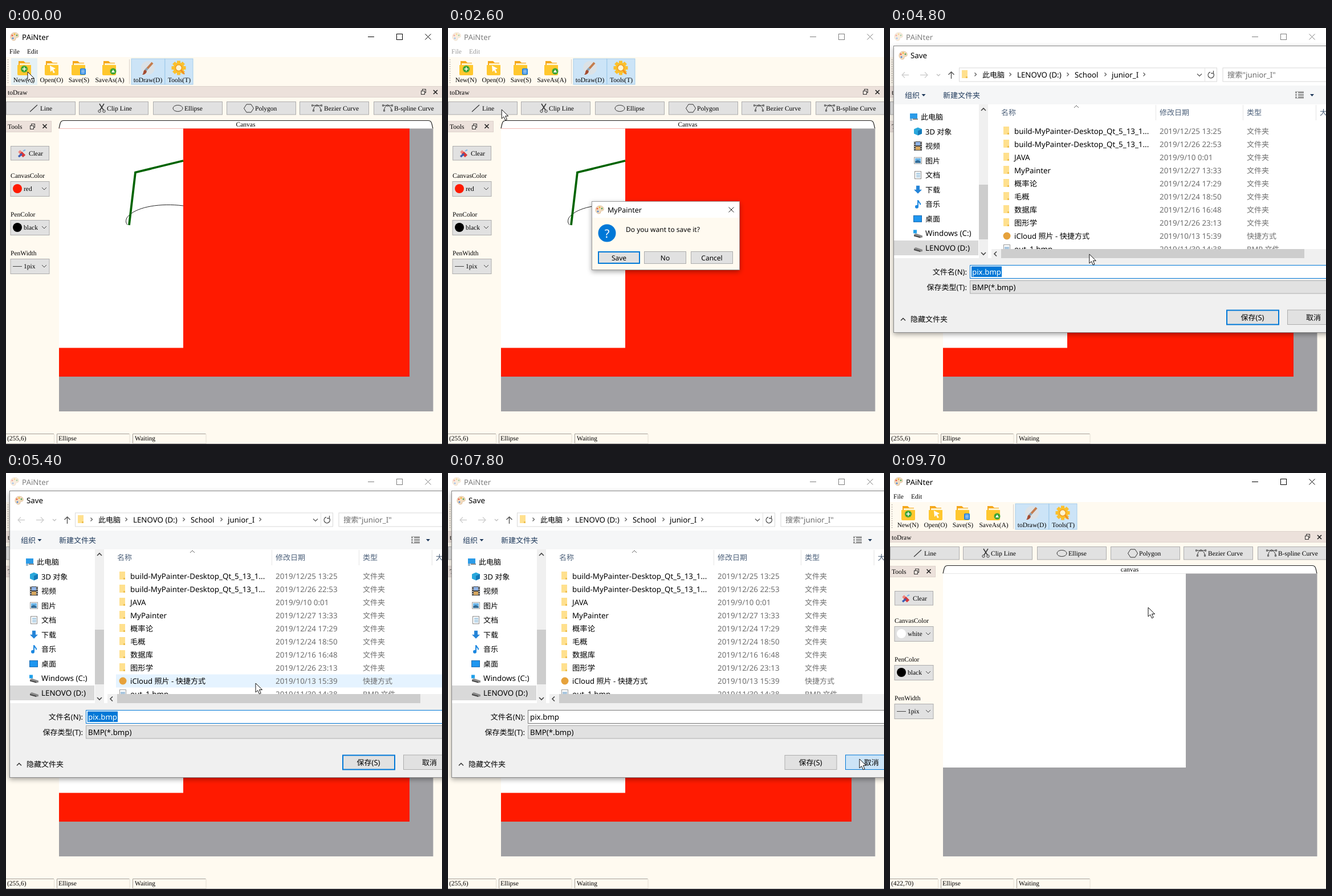
These frames come from a looping animation (765x732 px, 9800 ms). An HTML page:

```html
<!DOCTYPE html>
<html lang="en">
<head>
<meta charset="utf-8">
<title>Painter</title>
<style>
html, body { margin: 0; width: 100%; height: 100%; overflow: hidden; background: #fffaf0; }
svg { display: block; width: 765px; height: 732px; }
text { white-space: pre; text-rendering: geometricPrecision; }
.serif { font: 11.5px "Liberation Serif", "Times New Roman", serif; }
.sans { font: 13.3px "Noto Sans", "Noto Sans CJK SC", "Noto Sans CJK", sans-serif; }
</style>
</head>
<body>
<svg id="stage" viewBox="0 0 765 732"></svg>
<script>
const LOOP = 9800, STEP = 100;

// Drawing helpers
const rect = (x, y, w, h, fill, extra = '') =>
  `<rect x="${x}" y="${y}" width="${w}" height="${h}" fill="${fill}" ${extra}/>`;
const box = (x, y, w, h, fill, line, lw = 1, extra = '') =>
  rect(x + lw / 2, y + lw / 2, w - lw, h - lw, fill, `stroke="${line}" stroke-width="${lw}" ${extra}`);
const path = (d, line, lw = 1, fill = 'none', extra = '') =>
  `<path d="${d}" fill="${fill}" stroke="${line}" stroke-width="${lw}" ${extra}/>`;
const fillPath = (d, fill) => path(d, 'none', 0, fill);
const circle = (x, y, r, fill, extra = '') => `<circle cx="${x}" cy="${y}" r="${r}" fill="${fill}" ${extra}/>`;
const text = (cls, x, y, s, fill, extra) => `<text class="${cls}" x="${x}" y="${y}" fill="${fill}" ${extra}>${s}</text>`;
const serif = (x, y, s, fill = '#000', extra = '') => text('serif', x, y, s, fill, extra);
const sans = (x, y, s, fill = '#000', size = 13.3, extra = '') =>
  text('sans', x, y, s, fill, `style="font-size:${size}px" ${extra}`);
const group = (id, body, extra = '') => `<g id="${id}" ${extra}>${body}</g>`;
const at = (x, y, body) => `<g transform="translate(${x} ${y})">${body}</g>`;
const chevron = (x, y, dir, s = 4, line = '#555', lw = 1.2) => {
  const d = {
    down: `M${x - s} ${y - s / 2}l${s} ${s}l${s} ${-s}`,
    up: `M${x - s} ${y + s / 2}l${s} ${-s}l${s} ${s}`,
    right: `M${x - s / 2} ${y - s}l${s} ${s}l${-s} ${s}`,
    left: `M${x + s / 2} ${y - s}l${-s} ${s}l${s} ${s}`
  };
  return path(d[dir], line, lw);
};
const cross = (x, y, s, line = '#222', lw = 1) =>
  path(`M${x - s} ${y - s}l${2 * s} ${2 * s}M${x + s} ${y - s}l${-2 * s} ${2 * s}`, line, lw);
const arrowShape = 'M0 0V16L3.7 12.6L6.4 18.8L9.2 17.6L6.5 11.5H11.6Z';

// Icons
const palette = (x, y) => at(x, y,
  path('M0 -7C5 -7 8 -4 7 0C6 3 3 1 2 3C2 6 1 7 -2 7C-9 5 -9 -6 0 -7Z', '#d9b48a', 0.8, '#f3dcc0') +
  circle(-4, -2, 1.5, '#e8604c') + circle(0, -4, 1.4, '#f2b632') +
  circle(4, -2, 1.4, '#58a55c') + circle(-3, 3, 1.5, '#4a86d8'));
const folder = (x, y, badge = '') => at(x, y,
  fillPath('M-10 -12H-1L2 -9H10V8H-10Z', '#f5a81c') + rect(-8, -8, 18, 10, '#fff3cf') +
  fillPath('M-12 -5H12V11Q12 13 10 13H-10Q-12 13 -12 11Z', '#ffc72e') + badge);
const smallFolder = (x, y) => at(x, y,
  rect(-5, -7, 9, 14, '#f3cf6a') + fillPath('M-5 -7H5V5L2 7H-5Z', '#ffe08e') + rect(2, 4, 3, 3, '#eebf50'));
const drive = (x, y) => at(x, y, fillPath('M-7 -1L-4 -3L8 1V4L4 5L-7 1Z', '#8a8a8a') + fillPath('M-7 0L4 3V5L-7 2Z', '#444'));
const floatIcon = (x, y) => box(x - 2, y - 5, 7, 7, 'none', '#333') + box(x - 4, y - 2, 7, 7, '#ede3dd', '#333');
const nodes = (x, y) => at(x, y,
  path('M-6 5C-6 0 -3 -4 0 -4S7 0 7 5M-8 -4H8', '#333', 1) +
  [[-8, -4], [0, -4], [8, -4], [-6, 5], [7, 5]].map(([a, b]) => box(a - 1.5, b - 1.5, 3, 3, '#e1e1e1', '#333', 0.8)).join(''));

const toolIcons = {
  Line: path('M42 147L55 135', '#333', 1.1),
  'Clip Line': path('M164 133L171 144M172 133L165 144', '#333', 1.5) +
    circle(164, 146, 2.2, 'none', 'stroke="#333"') + circle(172, 146, 2.2, 'none', 'stroke="#333"'),
  Ellipse: '<ellipse cx="301.500" cy="141" rx="8.500" ry="5.500" fill="none" stroke="#333"/>',
  Polygon: path('M417.500 141L422 134H430L434.500 141L430 148H422Z', '#333'),
  'Bezier Curve': nodes(545.5, 140),
  'B-spline Curve': nodes(669.5, 140)
};

const gear = () => {
  let d = '';
  for (let i = 0; i < 8; i++) {
    const a = i * Math.PI / 4;
    d += `M0 0L${(12.5 * Math.cos(a)).toFixed(1)} ${(12.5 * Math.sin(a)).toFixed(1)}`;
  }
  return at(303, 70, path(d, '#fbc02d', 6) + circle(0, 0, 9.5, '#fbc02d') +
    circle(0, 0, 5.5, '#fff4d0', 'stroke="#ee9f20" stroke-width="1.500"') + path('M4 4L10 11', '#f08a24', 2.5));
};

function titleBar() {
  return rect(0, 0, 765, 51, '#fff') + group('title', palette(15, 15) + sans(28, 20.5, 'PAiNter') +
    path('M635 15.500H646', '#000') + box(685, 10, 11, 11, 'none', '#000') + cross(740.5, 15.5, 5, '#000')) +
    group('menu', serif(6, 45, 'File') + serif(37, 45, 'Edit'));
}

function toolbar() {
  const label = (x, s) => serif(x, 95, s, '#000', 'text-anchor="middle"');
  return path('M3.500 55V99', '#b5aca4', 1.5, 'none', 'stroke-dasharray="1.500 2.500"') +
    group('hover', rect(9, 53, 46, 47, '#e5f1f5')) +
    box(219.5, 53.5, 59.5, 46, '#cce4f7', '#a5cdec') + box(278.5, 53.5, 50, 46, '#cce4f7', '#a5cdec') +
    path('M216.500 55V98', '#d8d2ca') +
    folder(32, 70, circle(0, 2, 6, '#3fa535') + path('M-3.500 2H3.500M0 -1.500V5.500', '#fff', 1.5)) +
    folder(80, 70, fillPath('M-3 -4L7 1L3 3L6 8L3 9L1 4L-2 7Z', '#fff')) +
    folder(127, 70, rect(3, 1, 10, 11, '#2583e0', 'rx="1.500"') + path('M5 4H11M5 6.500H11M5 9H11', '#fff')) +
    folder(181, 70, circle(7, 6, 5.5, '#3fa535') + fillPath('M7 3L10 8H4Z', '#fff')) +
    circle(249, 70, 12, '#dce2e6') + path('M248 71L257 61', '#c47d4e', 4) + path('M245 74L248 71', '#8ca1b2', 4) +
    fillPath('M239 82C242 80 240 75 244 73L247 76C246 80 243 82 239 82Z', '#a34c32') + gear() +
    label(31.5, 'New(N)') + label(80, 'Open(O)') + label(128, 'Save(S)') + label(182, 'SaveAs(A)') +
    label(249, 'toDraw(D)') + label(304, 'Tools(T)');
}

function drawDock() {
  const buttons = [['Line', 0, 60], ['Clip Line', 128, 177], ['Ellipse', 258, 313], ['Polygon', 387, 437],
    ['Bezier Curve', 515, 558], ['B-spline Curve', 645, 681]];
  return box(-1, 102, 768, 20, '#ece1db', '#ddd2cc') + serif(3, 117, 'toDraw') + floatIcon(732, 112) + cross(753.5, 112.5, 3.5, '#222', 1.6) +
    buttons.map(([s, x, tx]) => box(x, 129, 122, 23.5, '#e1e1e1', '#adadad') + toolIcons[s] + serif(tx, 145, s)).join('');
}

function toolsDock() {
  const combo = (y, name, value, icon) => serif(8, y - 6, name) + box(7.5, y, 69, 27, '#e1e1e1', '#adadad') +
    icon + value + chevron(67, y + 13, 'down', 4, '#444', 1);
  const val = (y, s) => serif(31, y, s);
  return box(-1, 163, 81, 20, '#ece1db', '#ddd2cc') + serif(3, 177, 'Tools') + floatIcon(46, 173) + cross(68, 172.5, 3.5, '#222', 1.6) +
    box(8, 207, 68, 25.5, '#e1e1e1', '#adadad') +
    path('M23 216L27 220', '#f0847c', 5) + path('M26 219L32 225', '#d8363a', 6) + path('M22 226L28 221', '#3b5fb4', 3.5) +
    path('M30 216L34 214', '#7bb6e8', 2) + serif(40, 224, 'Clear') +
    combo(269, 'CanvasColor', `<text id="colorName" class="serif" x="31" y="286"></text>`, '<circle id="color" cx="20" cy="282" r="8"/>') +
    combo(337, 'PenColor', val(354, 'black'), circle(20, 350, 8, '#000')) +
    combo(405, 'PenWidth', val(422, '1pix'), path('M12 418.500H28', '#444'));
}

function canvasArea() {
  return path('M93 176.500C95 168 95 162.500 101 162.500H741C747 162.500 747 168 749 176.500', '#222', 1.2, '#fff') +
    `<text id="tab" class="serif" x="420.500" y="173" text-anchor="middle"></text>` +
    rect(93, 176.5, 656.5, 496.5, '#a0a0a4') +
    group('oldArt', rect(93, 176.5, 615, 435.5, '#ff1a00') + rect(93, 176.5, 218, 385, '#fff') +
      path('M213 345.500C208 340 211 332 217 328C232 314 270 307 311 312', '#222', 1) +
      path('M216 346L227 253.500L311 233', '#006400', 3.8)) +
    group('newArt', rect(93, 176.5, 426, 340.5, '#fff'));
}

function statusBar() {
  const cell = (x, w) => path(`M${x} 729V712.500H${x + w}`, '#a39e98') + path(`M${x + w + .5} 713V729.500H${x}`, '#e4ded4');
  return cell(-1, 85) + cell(89.5, 127) + cell(222.5, 128) +
    '<text id="status" class="serif" x="2" y="724"></text>' + serif(92, 724, 'Ellipse') + serif(226, 724, 'Waiting') +
    rect(0, 730, 765, 2, '#24242c');
}

function messageBox() {
  const button = (x, s, line) => box(x, 392, 74, 22, '#e1e1e1', line, line === '#0078d7' ? 2 : 1) +
    sans(x + 37, 407.5, s, '#000', 12, 'text-anchor="middle"');
  return box(252, 304, 260, 121, '#fffaf0', '#9a9a9a', 1, 'filter="url(#shadow)"') + rect(253, 305, 258, 28, '#fff') +
    palette(266, 319) + sans(280, 323.5, 'MyPainter', '#000', 12.5) + cross(497, 319, 4.5) +
    circle(279, 360, 15.5, '#0078d7') + sans(279, 367.5, '?', '#fff', 20, 'text-anchor="middle"') +
    sans(312, 358, 'Do you want to save it?', '#000', 12) +
    button(263, 'Save', '#0078d7') + button(344, 'No', '#adadad') + button(426, 'Cancel', '#adadad');
}

const files = [
  ['build-MyPainter-Desktop_Qt_5_13_1...', '2019/12/25 13:25'], ['build-MyPainter-Desktop_Qt_5_13_1...', '2019/12/26 22:53'],
  ['JAVA', '2019/9/10 0:01'], ['MyPainter', '2019/12/27 13:33'], ['概率论', '2019/12/24 17:29'], ['毛概', '2019/12/24 18:50'],
  ['数据库', '2019/12/16 16:48'], ['图形学', '2019/12/26 23:13'],
  ['iCloud 照片 - 快捷方式', '2019/10/13 15:39', '快捷方式'], ['out_1.bmp', '2019/11/30 14:38', 'BMP 文件']
];

const places = [
  ['此电脑', rect(-9, -6, 13, 9, '#2b9be8') + rect(-4, 3, 9, 2, '#888') + rect(-9, 3, 4, 4, '#9bb8cc')],
  ['3D 对象', fillPath('M-7 -4L0 -7L7 -4V4L0 7L-7 4Z', '#2aa8dc') + fillPath('M0 -1L7 -4V4L0 7Z', '#1479b8')],
  ['视频', rect(-7, -8, 14, 16, '#444') + rect(-4, -7, 8, 6, '#8fb4e8') + rect(-4, 1, 8, 6, '#d8a860') +
    path('M-5.500 -8V8M5.500 -8V8', '#ddd', 1.5, 'none', 'stroke-dasharray="2 2"')],
  ['图片', box(-7, -6, 14, 12, '#fff', '#999') + rect(-5, -4, 10, 8, '#69b4e8') + fillPath('M-5 4V1L0 -1L5 2V4Z', '#326a94')],
  ['文档', box(-6, -7, 12, 14, '#fff', '#888') + path('M-3 -3H4M-3 0H4M-3 3H4', '#4b93c4')],
  ['下载', fillPath('M-3 -7H3V0H7L0 7L-7 0H-3Z', '#2484d8')],
  ['音乐', path('M0 4V-7C1 -3 5 -3 4 1', '#1b87e0', 2) + circle(-2, 4.5, 3, '#1b87e0')],
  ['桌面', box(-8, -6, 15, 12, '#1e96f0', '#1567b0')],
  ['Windows (C:)', drive(0, 3) + rect(-8, -6, 6, 6, '#20a0ea')],
  ['LENOVO (D:)', drive(0, 2)]
];

function fileList() {
  const rows = files.map(([name, date, type = '文件夹'], i) => {
    const y = 181 + 23 * i, base = y + 4.5;
    const icon = i < 8 ? smallFolder(204, y - 1) : i === 8
      ? circle(205, y, 6.5, '#e6a23c')
      : box(199, y - 8, 12, 16, '#fff', '#999') + rect(201, y - 4, 8, 7, '#a9c6de');
    return icon + sans(218, base, name, '#000', i === 8 ? 13.1 : 13.35) + sans(473, base, date, '#6d6d6d', 13.35) + sans(626, base, type, '#6d6d6d', 13);
  }).join('');
  const head = (x, s) => sans(x, 153, s, '#4c607a', 13);
  return path('M466.500 135V162M619.500 135V162M747.500 135V162', '#e5e5e5') + chevron(327, 138, 'up', 4, '#666', 1) +
    head(195, '名称') + head(473, '修改日期') + head(626, '类型') + head(754, '大') +
    '<g clip-path="url(#list)"><rect id="rowHover" x="193" width="580" height="23" fill="#e5f3ff"/>' + rows + '</g>' +
    rect(178, 388, 590, 16, '#f0f0f0') + rect(195, 388, 532, 16, '#cdcdcd') + chevron(185, 396.5, 'left', 4, '#444', 1.6);
}

function saveDialog() {
  const nav = places.map(([s, icon], i) => {
    const y = 156 + 25.55 * i;
    return at(i ? 49 : 44, y, icon) + sans(i ? 62 : 54, y + 5, s, '#000', s.length > 6 ? 13.35 : 13);
  }).join('');
  const crumb = [[162, '此电脑', 13], [223, 'LENOVO (D:)'], [324, 'School'], [389, 'junior_I']];
  const triangle = (x, y) => fillPath(`M${x - 3.5} ${y - 2}h7l-3.500 4Z`, '#1e395b');
  return box(6, 31, 790, 504, '#f0f0f0', '#8a8a8a', 1, 'filter="url(#shadow)"') + rect(7, 32, 760, 372, '#fff') +
    palette(23, 48) + sans(36, 53, 'Save') +
    path('M33 82.500H21M26 77.500L21 82.500L26 87.500M53 82.500H66M61 77.500L66 82.500L61 87.500', '#cfcfcf', 1.3) +
    chevron(85, 82.5, 'down', 3, '#bbb') + path('M107.500 89V77M102.500 82L107.500 77L112.500 82', '#555', 1.4) +
    box(121, 69.5, 453, 25, '#fff', '#d9d9d9') + path('M552.500 70V94', '#e3e3e3') + smallFolder(131, 81) +
    [150, 211, 312, 378, 446].map(x => chevron(x, 81.5, 'right', 3, '#555')).join('') +
    crumb.map(([x, s, size]) => sans(x, 86.5, s, '#000', size)).join('') +
    chevron(543, 82.5, 'down', 4) + path('M567 79A5.200 5.200 0 1 1 562 77.500M567.500 75V79.500H563', '#555', 1.3) +
    box(583.5, 69.5, 200, 25, '#fff', '#d9d9d9') + sans(592, 86.5, '搜索"junior_I"', '#6d6d6d') +
    rect(7, 101, 760, 33, '#f5f6f7') + sans(26, 122.5, '组织', '#1e395b', 13) + triangle(59, 118) +
    sans(93, 122.5, '新建文件夹', '#1e395b', 13) + path('M711 113.500H714M711 117.500H714M711 121.500H714M716 113.500H726M716 117.500H726M716 121.500H726', '#777', 2) +
    path('M711 111.500H726M711 123.500H726', '#aaa') + triangle(740.5, 118) +
    rect(7, 373, 148, 26, '#d9d9d9') + nav +
    rect(156, 134, 16, 270, '#f0f0f0') + rect(156, 275, 16, 96, '#cdcdcd') +
    chevron(164, 143, 'up', 4, '#444', 1.6) + chevron(164, 396, 'down', 4, '#444', 1.6) + fileList() +
    sans(135, 433, '文件名(N):', '#000', 13, 'text-anchor="end"') + sans(135, 459.5, '保存类型(T):', '#000', 13, 'text-anchor="end"') +
    '<rect id="field" x="140.500" y="416.500" width="640" height="23" fill="#fff"/>' +
    '<rect id="selection" x="143" y="418.500" width="53" height="18.500" fill="#0078d7"/>' +
    '<text id="fileName" class="sans" x="144" y="432.500">pix.bmp</text>' +
    box(140, 443, 640, 23.5, '#e1e1e1', '#adadad') + sans(144, 459.5, 'BMP(*.bmp)') +
    chevron(23, 511.5, 'up', 4, '#333', 1.5) + sans(36, 516, '隐藏文件夹', '#000', 13) +
    '<rect id="saveBtn" x="591" y="495.500" width="91" height="25" fill="#e1e1e1"/>' +
    sans(636, 512.5, '保存(S)', '#000', 13, 'text-anchor="middle"') +
    '<rect id="cancelBtn" x="697.500" y="495" width="91" height="25.500"/>' + sans(730, 512.5, '取消', '#000', 13);
}

document.getElementById('stage').innerHTML =
  `<defs><filter id="shadow" x="-10%" y="-10%" width="120%" height="125%"><feDropShadow dx="0" dy="3" stdDeviation="4" flood-opacity=".35"/></filter>
  <clipPath id="list"><rect x="178" y="165" width="590" height="223"/></clipPath></defs>` +
  rect(0, 0, 765, 732, '#fffaf0') + titleBar() + toolbar() + drawDock() + toolsDock() + canvasArea() + statusBar() +
  group('msg', messageBox()) + group('dialog', saveDialog()) +
  group('cursor', path(arrowShape, '#111', 1, '#fff'));

const el = {};
document.querySelectorAll('[id]').forEach(n => el[n.id] = n);
const set = (id, attrs) => { for (const k in attrs) el[id].setAttribute(k, attrs[k]); };
const show = (id, on) => { el[id].style.display = on ? '' : 'none'; };
const fade = (id, o) => { show(id, o > 0); set(id, { opacity: o }); };

// Pointer stops: time, x, y
const stops = [[0, 38, 77], [300, 38, 77], [1200, 26, 67], [2200, 26, 67], [3500, 328, 404], [4600, 328, 404],
  [5300, 438, 369], [5700, 438, 369], [6800, 666, 471], [7400, 722, 502], [8200, 722, 502], [9000, 453, 236], [LOOP, 453, 236]];
const clamp = v => Math.max(0, Math.min(1, v));
const ramp = (t, from, to) => clamp((t - from) / (to - from));

function pointer(t) {
  const i = stops.findIndex(s => s[0] > t);
  const [t0, x0, y0] = stops[i - 1], [t1, x1, y1] = stops[i];
  const p = ramp(t, t0, t1), e = p * p * (3 - 2 * p);
  return [x0 + (x1 - x0) * e, y0 + (y1 - y0) * e];
}

function render(t) {
  const [x, y] = pointer(t);
  const asking = t >= 1700 && t < 4100, saving = t >= 4400 && t < 8000, fresh = t >= 8000;
  const cancelled = t >= 7600;
  set('cursor', { transform: `translate(${x.toFixed(1)} ${y.toFixed(1)})` });
  fade('msg', ramp(t, 1600, 1800) * (1 - ramp(t, 4000, 4108)));
  fade('dialog', ramp(t, 4300, 4500) * (1 - ramp(t, 7850, 8000)));
  set('title', { opacity: asking || saving ? 0.5 : 1 });
  set('menu', { opacity: t >= 1700 && t < 8000 ? 0.4 : 1 });
  show('hover', t < 1700);

  const row = Math.floor((y - 169.5) / 23);
  show('rowHover', saving && x > 193 && y < 388 && row >= 0);
  set('rowHover', { y: 169.5 + 23 * row });
  show('selection', !cancelled);
  set('field', { stroke: cancelled ? '#7a7a7a' : '#0078d7' });
  set('fileName', { fill: cancelled ? '#000' : '#fff' });
  set('saveBtn', { stroke: cancelled ? '#adadad' : '#0078d7', 'stroke-width': cancelled ? 1 : 2 });
  const over = x > 697 && y > 495;
  set('cancelBtn', { fill: over ? '#cce4f7' : '#e1e1e1', stroke: over ? '#0078d7' : '#adadad' });

  show('oldArt', !fresh);
  show('newArt', fresh);
  el.tab.textContent = fresh ? 'canvas' : 'Canvas';
  el.colorName.textContent = fresh ? 'white' : 'red';
  set('color', { fill: fresh ? '#fff' : '#ff1a00' });
  const inside = fresh && x < 519 && y < 517;
  el.status.textContent = inside ? `(${Math.round((x - 93) * 1.172)},${Math.round((y - 176) * 1.172)})` : '(255,6)';
}

const start = performance.now();
(function tick() {
  const t = (performance.now() - start) % LOOP;
  render(Math.floor(t / STEP) * STEP);
  requestAnimationFrame(tick);
})();
</script>
</body>
</html>
```
